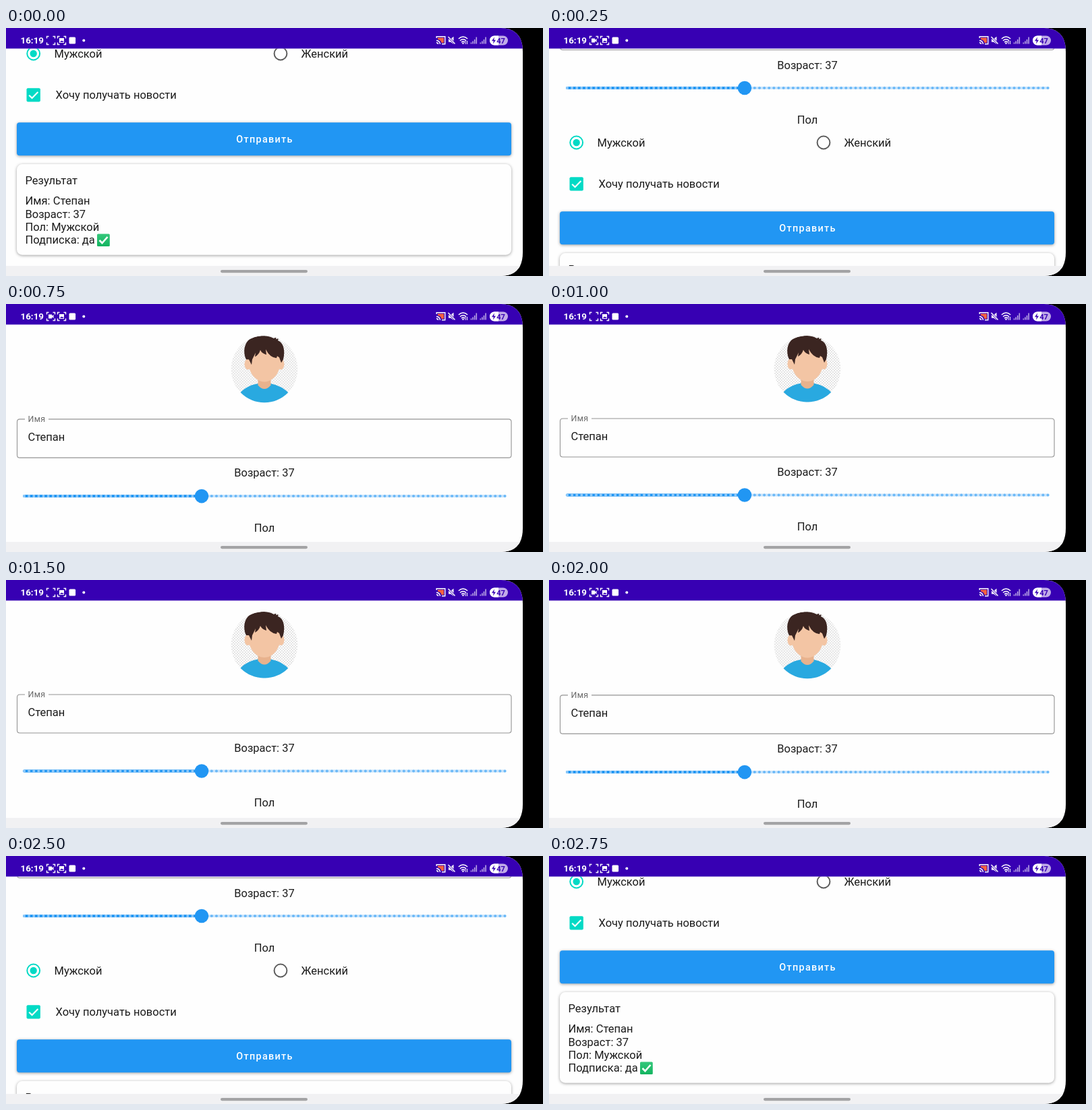
Animation of 796x368 px, one loop 3000 ms. Source, as an HTML page:

```html
<!DOCTYPE html>
<html lang="ru">
<head>
<meta charset="utf-8">
<style>
  html, body { margin: 0; width: 100%; height: 100%; overflow: hidden; background: #000; }
  svg { display: block; }
  text { font: 16.5px Roboto, sans-serif; fill: #1c1c1c; white-space: pre; }
  .mid { text-anchor: middle; }
  .label { font-size: 12.4px; letter-spacing: .4px; fill: #6b6b6b; }
  .button { font-size: 14.4px; font-weight: 500; letter-spacing: 1.29px; fill: #fff; }
  .clock { font-size: 13.4px; font-weight: 700; fill: #fff; }
  .charge { font-size: 11px; font-weight: 700; fill: #3700b3; }
  .line { fill: none; stroke: #fff; stroke-width: 1.4; }
  .card { filter: drop-shadow(0 1px 2px rgba(0, 0, 0, .38)); }
</style>
</head>
<body>
<svg width="796" height="368" viewBox="0 0 796 368">
  <defs>
    <clipPath id="screen"><path d="M0 0H734Q766 1 766 35V333Q766 367 734 368H0Z"/></clipPath>
    <clipPath id="view"><path d="M0 30.5H766V353H0Z"/></clipPath>
    <clipPath id="round"><circle cx="383" cy="96.3" r="49.3"/></clipPath>
    <pattern id="checker" width="4" height="4" patternUnits="userSpaceOnUse">
      <path d="M0 0H4V4H0Z" fill="#fff"/>
      <path d="M0 0H2V2H0ZM2 2H4V4H2Z" fill="#e4e4e4"/>
    </pattern>
    <linearGradient id="green" x2="0" y2="1">
      <stop stop-color="#35c77b"/><stop offset="1" stop-color="#12b45f"/>
    </linearGradient>
    <path id="corners" class="line" d="M0 3.5V.5H3M9 .5H12V3.5M12 9.5V12.5H9M3 12.5H0V9.5"/>
    <path id="bars" d="M0 10V8H1.6V10ZM2.6 10V6H4.2V10ZM5.2 10V3.5H6.8V10ZM7.8 10V0H9.4V10Z" fill="#fff"/>
  </defs>

  <g clip-path="url(#screen)">
    <path d="M0 0H766V368H0Z" fill="#fefefe"/>

    <g clip-path="url(#view)"><g id="page">
      <g clip-path="url(#round)">
        <path d="M333 46H433V147H333Z" fill="url(#checker)"/>
        <path d="M345 147V134Q354 121 374 117.5H392Q411 121 421 134V147Z" fill="#29a9e0"/>
        <path d="M373.5 106H392.5V120Q383 131 373.5 120Z" fill="#e8b28d"/>
        <g fill="#f3c5a4">
          <ellipse cx="358.5" cy="89" rx="5" ry="8"/>
          <ellipse cx="407.5" cy="89" rx="5" ry="8"/>
          <path d="M360 66H406V88C406 104 394 115 383 115S360 104 360 88Z"/>
        </g>
        <path d="M356 82C351 72 353 59 360 53C370 46 388 45 397 51L401 49L400 52L404 51L403 54
          C412 57 414 70 411 82L408 87L405 79L402 77L401 80Q391 79 385 67L386 75Q379 73 377 68
          Q375 75 369 78L370 72L365 82L364 90L360 82Z" fill="#3b2521"/>
      </g>

      <path d="M28 170H20.5Q16.5 170 16.5 174V223Q16.5 227 20.5 227H745Q749 227 749 223V174Q749 170 745 170H63"
        fill="none" stroke="#949494" stroke-width="1.1"/>
      <text class="label" x="32.5" y="174.3">Имя</text>
      <text x="32.5" y="202.3">Степан</text>

      <text class="mid" x="383" y="255">Возраст: 37</text>
      <g fill="none" stroke-width="4.1" stroke-linecap="round">
        <path d="M27 283.5H739.5" stroke="#c8e4fc"/>
        <path d="M27 283.5H290" stroke="#2196f3"/>
        <path d="M27 283.5H288" stroke="#90caf9" stroke-dasharray="0 7.125"/>
        <path d="M297.75 283.5H740" stroke="#6cb9f7" stroke-dasharray="0 7.125"/>
      </g>
      <circle cx="290" cy="283.5" r="10.3" fill="#2196f3"/>

      <text class="mid" x="383" y="336">Пол</text>
      <g fill="none" stroke-width="2">
        <circle cx="40.7" cy="364.5" r="9.4" stroke="#03dac5"/>
        <circle cx="407" cy="364.5" r="9.4" stroke="#5e5e5e"/>
      </g>
      <circle cx="40.7" cy="364.5" r="5.2" fill="#03dac5"/>
      <text x="71.5" y="370.3">Мужской</text>
      <text x="437.5" y="370.3">Женский</text>

      <rect x="30.5" y="415.7" width="20.4" height="20.4" rx="2" fill="#03dac5"/>
      <path d="M34.2 426.2L38.6 430.6L47.4 421.6" fill="none" stroke="#fff" stroke-width="2.1"/>
      <text x="73.5" y="431.8">Хочу получать новости</text>

      <rect class="card" x="16" y="466.7" width="733" height="49" rx="4" fill="#2196f3"/>
      <text class="button" x="341.3" y="496.6">Отправить</text>

      <rect class="card" x="16" y="528.6" width="733" height="134.6" rx="8" fill="#fefefe"/>
      <text x="28.5" y="558.5">Результат</text>
      <text x="28.5" y="588.8">Имя: Степан</text>
      <text x="28.5" y="608.1">Возраст: 37</text>
      <text x="28.5" y="627.5">Пол: Мужской</text>
      <text x="28.5" y="646.8">Подписка: да</text>
      <rect x="135" y="632" width="18.8" height="18.4" rx="1.5" fill="url(#green)"/>
      <path d="M138.5 641.5L142.5 645.5L150.5 636.5" fill="none" stroke="#fff" stroke-width="2.6"/>
    </g></g>

    <path d="M0 0H766V30.5H0Z" fill="#3700b3"/>
    <text class="clock" x="21.5" y="23.3">16:19</text>
    <use href="#corners" x="60.5" y="12"/>
    <path id="camera" d="M63 15.5H68V17.5L70.5 16V21L68 19.5V21.5H63Z" fill="#fff"/>
    <use href="#corners" x="76.5" y="12"/>
    <path d="M79 15H86V22H79Z" fill="#fff"/>
    <path d="M80 21L82 18.5L83.2 19.8L84.2 18.8L85.5 21Z" fill="#3700b3"/>
    <rect x="93.5" y="13.5" width="9.6" height="10" rx="1.5" fill="#fff"/>
    <circle cx="115.3" cy="18.5" r="2" fill="#fff"/>

    <path class="line" d="M638.2 15V12.7H650.8V23.8H646"/>
    <path d="M640 14.5H649V22H645.5Q644.5 17.5 640 17Z" fill="#f4603f"/>
    <path class="line" d="M638 18.5Q643 19 643.5 24M638 21.5Q640.5 22 640.5 24"/>
    <path d="M656 16.3H659L663.5 12.8V24L659 20.8H656Z" fill="#fff"/>
    <path d="M655.5 13L665.5 23.5" stroke="#3700b3" stroke-width="3"/>
    <path class="line" d="M655.5 13L665.5 23.5"/>
    <path class="line" d="M670.8 16Q677.5 10 684.2 16M673 18.8Q677.5 14.8 682 18.8M675 21.2Q677.5 19 680 21.2"/>
    <circle cx="677.5" cy="22.8" r="1.2" fill="#fff"/>
    <path d="M681 19V24M683.5 24V19" stroke="#fff"/>
    <use href="#bars" x="688.7" y="13.6" opacity=".65"/>
    <use href="#bars" x="702.5" y="13.6" opacity=".65"/>
    <rect x="717" y="11.5" width="27" height="14" rx="7" fill="#c0abe8"/>
    <path d="M730 11.5H724A7 7 0 0 0 724 25.5H730Z" fill="#fff"/>
    <path d="M724 13.5L720 19.3H722.8L722 23.5L726 17.7H723.2Z" fill="#3700b3"/>
    <text class="charge" x="727.2" y="22.5">47</text>

    <path d="M0 353H766V368H0Z" fill="#f1f1f3"/>
    <rect x="318" y="359" width="129" height="4.2" rx="2.1" fill="#a3a3a5"/>
  </g>
</svg>
<script>
  const STEP = 250, STEPS = 12, TOP = 31;
  // The scroll runs up to the top and back the same way; the top edge stretches.
  const poses = [
    { scroll: 326.5, stretch: 1 },
    { scroll: 194.5, stretch: 1 },
    { scroll: 0, stretch: 1.02 },
    { scroll: 0, stretch: 1.006 },
    { scroll: 0, stretch: 1 },
  ];
  const page = document.getElementById('page');
  const camera = document.getElementById('camera');

  function draw(now) {
    const step = Math.floor(now / STEP) % STEPS;
    const index = Math.min(step, STEPS - 1 - step, poses.length - 1);
    const { scroll, stretch } = poses[index];
    page.setAttribute('transform',
      `translate(0 ${TOP}) scale(1 ${stretch}) translate(0 ${-TOP - scroll})`);
    camera.setAttribute('visibility', index > 0 && index < 4 ? 'visible' : 'hidden');
    requestAnimationFrame(draw);
  }
  draw(performance.now());
</script>
</body>
</html>
```
